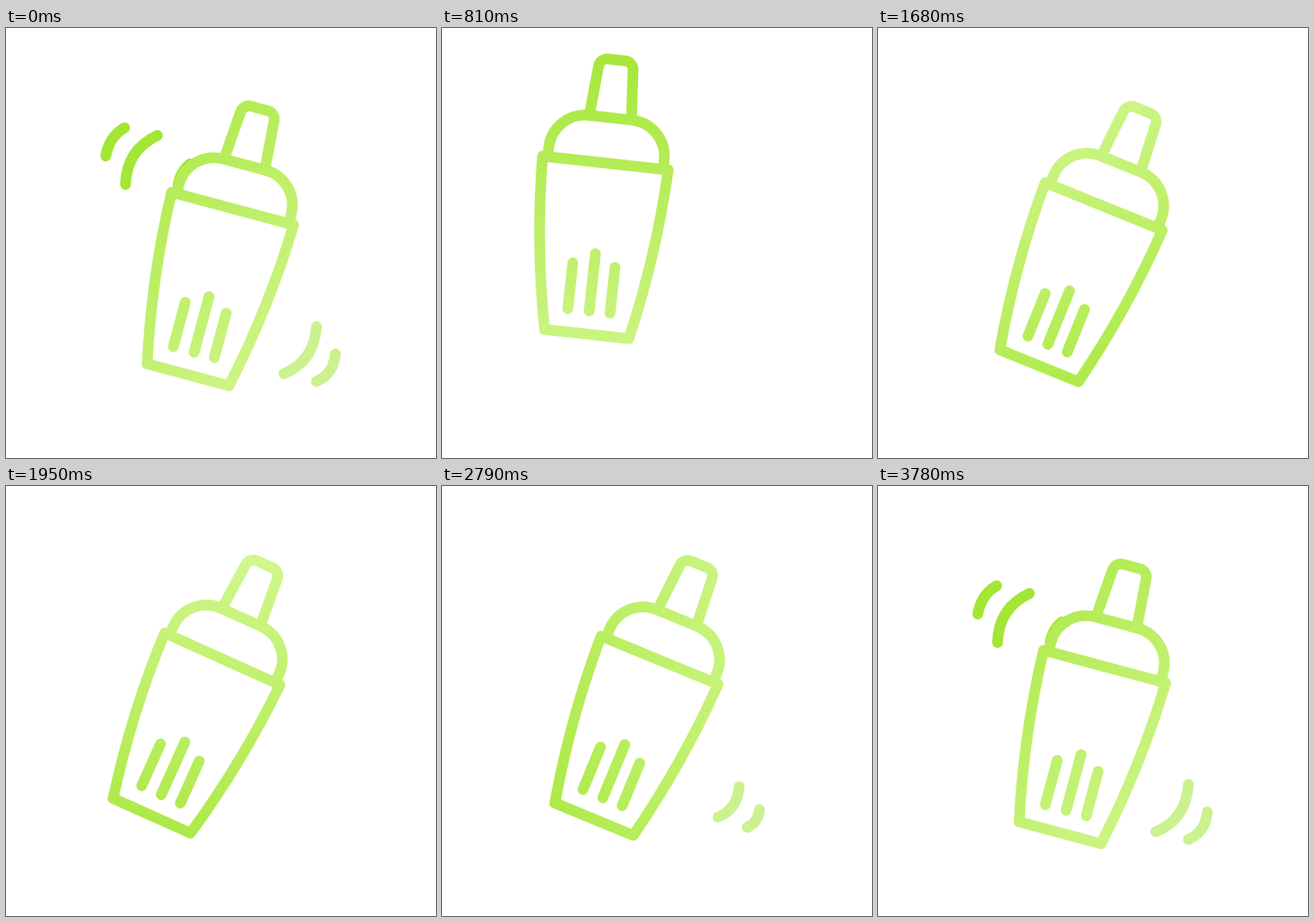
These frames come from a looping animation (500 by 500 pixels, 4310 ms). An HTML page with a canvas:

```html
<!DOCTYPE html>
<html lang="en">
<head>
<meta charset="utf-8">
<title>Cocktail shaker</title>
<style>
  html, body { margin: 0; width: 100%; height: 100%; overflow: hidden; background: #fff; }
  canvas { display: block; width: 500px; height: 500px; }
</style>
</head>
<body>
<canvas id="stage" width="500" height="500"></canvas>
<script>
const ctx = document.getElementById('stage').getContext('2d');
const LOOP = 4310, REST = 3780, STEP = 30;
const DARK = '#a3e635', LIGHT = '#d9f99d', PALE = '#cbf28f';

// time, x, y, tilt in degrees; the position is the middle of the rim
const shake = [
  [0, 263.5, 210, 15],
  [540, 203, 163, 8],
  [810, 190, 157, 6.25],
  [1095, 211, 174, 15],
  [1380, 302, 253.5, 18.5],
  [1450, 303, 254.5, 18.7],
  [1840, 239, 180, 24],
  [1950, 251.5, 201, 24.2],
  [2250, 282.5, 236, 14.2],
  [2400, 303, 248, 14],
  [2700, 257, 207, 21.5],
  [2790, 253, 202.5, 22.4],
  [3000, 243, 192, 22],
  [3240, 247, 195, 20],
  [REST, 263.5, 210, 15]
];

// time, direction of the dark end, clockwise from the top
const shade = [
  [0, -45], [810, 2], [1380, 105], [1950, 190],
  [2250, 215], [2790, 255], [REST, 315]
];

// start, control and end point of each motion line
const leftLines = [
  [138, 116, 120, 126, 116, 149],
  [176, 125, 140, 142, 139, 182],
  [214, 158, 203, 166, 200, 182]
];
const rightLines = [
  [361, 347, 358, 388, 323, 402],
  [383, 379, 381, 402, 361, 411]
];

const clamp = v => Math.min(1, Math.max(0, v));
const easeOut = v => 1 - (1 - v) ** 3;

function slope(keys, i, col) {
  if (i === 0 || i === keys.length - 1) return 0;
  const rate = k => (keys[k + 1][col] - keys[k][col]) / (keys[k + 1][0] - keys[k][0]);
  const a = rate(i - 1), b = rate(i);
  return a * b <= 0 ? 0 : 2 * a * b / (a + b);
}

// Monotone cubic interpolation of one column
function sample(keys, col, t) {
  let i = 0;
  while (i < keys.length - 2 && t > keys[i + 1][0]) i++;
  const from = keys[i], to = keys[i + 1];
  const span = to[0] - from[0], u = clamp((t - from[0]) / span);
  const u2 = u * u, u3 = u2 * u;
  return (2 * u3 - 3 * u2 + 1) * from[col] + (3 * u2 - 2 * u3) * to[col]
    + span * ((u3 - 2 * u2 + u) * slope(keys, i, col) + (u3 - u2) * slope(keys, i + 1, col));
}

function gradient(degrees) {
  const a = degrees * Math.PI / 180, r = 245;
  const dx = Math.sin(a) * r, dy = -Math.cos(a) * r;
  const fill = ctx.createLinearGradient(250 + dx, 250 + dy, 250 - dx, 250 - dy);
  fill.addColorStop(0, DARK);
  fill.addColorStop(1, LIGHT);
  return fill;
}

function shakerPath() {
  const path = new Path2D();
  // cup
  path.moveTo(-73.5, 0);
  path.lineTo(73.5, 0);
  path.quadraticCurveTo(70.6, 100, 49.3, 200);
  path.lineTo(-49.3, 200);
  path.quadraticCurveTo(-70.6, 100, -73.5, 0);
  path.closePath();
  // dome
  path.moveTo(-67.5, 0);
  path.lineTo(-67.5, -11);
  path.arcTo(-67.5, -53, -25.5, -53, 42);
  path.lineTo(25.5, -53);
  path.arcTo(67.5, -53, 67.5, -11, 42);
  path.lineTo(67.5, 0);
  // cap
  path.moveTo(-24.5, -54);
  path.lineTo(-20.4, -108);
  path.arcTo(-19.5, -120.5, 0, -120.5, 10);
  path.arcTo(19.5, -120.5, 20.4, -108, 10);
  path.lineTo(24.5, -54);
  // stripes
  for (const [x, top] of [[-25, 119.5], [0, 106], [24.3, 119.5]]) {
    path.moveTo(x, top);
    path.lineTo(x, 173);
  }
  return path;
}

const shaker = shakerPath();

function drawShaker(t) {
  const a = sample(shake, 3, t) * Math.PI / 180;
  const place = new DOMMatrix([
    Math.cos(a), Math.sin(a), -Math.sin(a), Math.cos(a),
    sample(shake, 1, t), sample(shake, 2, t)
  ]);
  const outline = new Path2D();
  outline.addPath(shaker, place);
  ctx.strokeStyle = gradient(sample(shade, 1, t));
  ctx.stroke(outline);
}

function drawLines(lines, side, color, start, t) {
  const leave = clamp(t / 500), enter = easeOut(clamp((t - start) / 510));
  const leaving = t < 500;
  const scale = leaving ? 1 - leave ** 3 : enter;
  if (scale < 0.04) return;
  const shift = side * (leaving ? 60 * leave : -33 * (1 - enter));
  ctx.strokeStyle = color;
  for (const [ax, ay, cx, cy, bx, by] of lines) {
    const mx = (ax + 2 * cx + bx) / 4, my = (ay + 2 * cy + by) / 4;
    const px = x => mx + (x - mx) * scale + shift;
    const py = y => my + (y - my) * scale + shift * 0.83;
    ctx.beginPath();
    ctx.moveTo(px(ax), py(ay));
    ctx.quadraticCurveTo(px(cx), py(cy), px(bx), py(by));
    ctx.stroke();
  }
}

function draw(now) {
  const t = Math.min(REST, Math.floor((now % LOOP) / STEP) * STEP);
  ctx.fillStyle = '#fff';
  ctx.fillRect(0, 0, 500, 500);
  ctx.lineWidth = 12.5;
  ctx.lineCap = ctx.lineJoin = 'round';
  drawLines(leftLines, -1, DARK, 3260, t);
  drawLines(rightLines, 1, PALE, 2640, t);
  drawShaker(t);
}

const begin = performance.now();
function tick() {
  draw(performance.now() - begin);
  requestAnimationFrame(tick);
}
tick();
</script>
</body>
</html>
```
